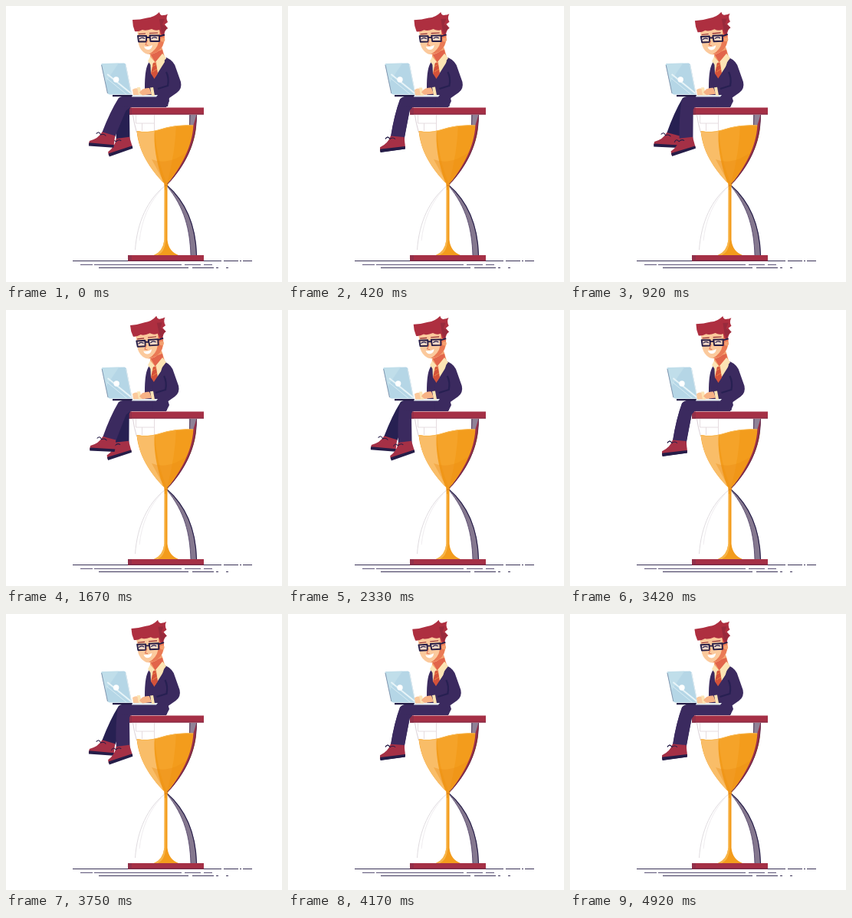
An HTML page with a canvas that plays this animation: 360x360 px, repeating every 5 s.

```html
<!DOCTYPE html>
<html lang="en">
<head>
<meta charset="utf-8">
<title>Working on the hourglass</title>
<style>
html, body { margin: 0; width: 100%; height: 100%; overflow: hidden; background: #fff; }
canvas { display: block; width: 100vw; height: 100vh; }
</style>
</head>
<body>
<canvas id="stage" width="360" height="360"></canvas>
<script>
const ctx = document.getElementById('stage').getContext('2d');
const LOOP = 5000, FRAMES = 60, TAU = Math.PI * 2;
const SUIT = '#3b2a5f', NAVY = '#272052', INK = '#251d48';
const RED = '#a53046', HAIR = '#ae2f40';
const SKIN = '#fbc99c', BLUSH = '#ea7a55', CREAM = '#fce4b4', SAND = '#f39c1c';

function fill(d, color) {
  ctx.fillStyle = color;
  ctx.fill(new Path2D(d));
}

function stroke(d, color, width = 1) {
  ctx.strokeStyle = color;
  ctx.lineWidth = width;
  ctx.stroke(new Path2D(d));
}

function rect(x, y, w, h, color) {
  ctx.fillStyle = color;
  ctx.fillRect(x, y, w, h);
}

function dot(x, y, r, color) {
  ctx.fillStyle = color;
  ctx.beginPath();
  ctx.arc(x, y, r, 0, TAU);
  ctx.fill();
}

function pivot(x, y, degrees, draw) {
  ctx.save();
  ctx.translate(x, y);
  ctx.rotate(degrees * Math.PI / 180);
  ctx.translate(-x, -y);
  draw();
  ctx.restore();
}

function shift(x, y, draw) {
  ctx.save();
  ctx.translate(x, y);
  draw();
  ctx.restore();
}

function ground() {
  stroke('M87 332.5H281M284 332.5H303M305 332.5H307M309 332.5H321', '#3b3358');
  stroke('M97 337.5H113M115 337.5H229M233 337.5H254M258 337.5H269', '#5d5478');
  stroke('M121 341.5H238M243 341.5H271M274 341.5H277M287 341.5H290', '#3b3358');
}

function plate(y, h) {
  rect(159, y, 99, h, RED);
  rect(159, y, 5, h, '#92304a');
  rect(159, y + h - 1, 99, 1, '#7c2742');
}

function upperGlass() {
  // Pane reflections
  stroke('M169.5 142V153H193.5V142M177.5 153V163M193.5 153V163', '#e3d9dd', 0.9);
  stroke('M165.5 142Q167 153 170.5 165', '#d5cad1', 0.9);
  fill('M239 142H249Q249 150 247 158L239 156Z', '#8f8297');
  stroke('M240 142L239.5 156', '#56405f');

  const sand = 'M170.5 163Q184 166 198 162Q222 154 248 156C247 182 231 210 211 232L209 235L207 232C188 213 173 190 170.5 163Z';
  fill(sand, SAND);
  ctx.save();
  ctx.clip(new Path2D(sand));
  fill('M170 160L194 160Q191 190 205 230L209 235L180 215Z', '#f9bd68');
  fill('M194 158L222 154Q221 190 210 232Q196 200 194 158Z', '#f5a329');
  fill('M190 200Q212 209 240 188L209 235Z', 'rgba(233,139,18,.35)');
  ctx.restore();
  stroke('M171 163.5Q184 166 198 162Q222 154 248 156', '#f9b64b');
  fill('M248.5 142C249 180 233 209 210 234C229 208 243 184 244.5 155Z', '#9a3048');
  stroke('M248.5 142C248.5 180 232.5 209 210.5 232', '#5a2a4c', 0.9);
}

function lowerGlass() {
  stroke('M207 235C185 252 171 282 168.5 318', '#dcd7dc', 0.9);
  stroke('M202 240C186 258 177 279 174 306', '#ebe8eb', 0.8);
  fill('M210 234C237 257 248 290 249 325H241C240 292 234 265 210 234Z', '#85788f');
  stroke('M210 234C236.5 257 247.5 290 248.5 325', INK, 1.1);
  stroke('M210 235C233 263 240 292 241 325', '#54446a', 0.9);

  fill('M206 229H212L210.5 236V305Q212 320 225 325H193Q205 320 206.5 305V236Z', SAND);
  fill('M207 240H208.2V307Q207 321 198 325H193Q205 320 206.5 305Z', '#f8b548');
  rect(207.5, 232, 3, 3, '#c66c22');
}

function hourglass() {
  lowerGlass();
  upperGlass();
  plate(132.5, 9);
  plate(325, 7.5);
}

function calf(angle, color) {
  pivot(155, 125, angle, () => {
    fill('M146 122Q150 117 160 118L168 125L159 136Q156 153 152.5 174L135 171Q139 142 146 122Z', color);
    fill('M135 170L152.5 171L154 185L121.5 190V185Q132 180 135 170Z', RED);
    fill('M121.5 187.5L154 183V186.5L122 191.5Z', INK);
    stroke('M128 174Q131 169 134 174Q138 171 141 174', INK, 1);
  });
}

function legs(swing) {
  const rest = 1.2;
  calf(rest - swing, NAVY);
  calf(rest + swing, SUIT);
  fill('M148 121Q151 117 161 117.5H211L213 124L209 132H160Q150 132 146 128Z', SUIT);
}

function torso(lean) {
  fill('M188 70L207 66L210 73V131H186Q180 121 181 106Q181 84 185 76Z', SUIT);
  fill('M188 67L205 63L207 73L195 92L189 88Z', CREAM);
  fill('M191 71L196 70L196 75L198 88L193.5 95L189 88L191.5 76Z', '#d4523a');
  stroke('M191 79L196 76M191 86L197 82', '#ed8c45', 0.9);

  // Near shoulder and arm
  shift(-3 * lean, 0, () => {
    fill('M209 67Q220 72 222 82L228 99Q230 108 223 113L213 120L211 131H193L193 98L205 80Z', SUIT);
    stroke('M209 86Q213 94 211 104L198 108', NAVY, 2.2);
  });
}

function eye(x, y) {
  rect(x, y, 9, 5, '#f0d9cd');
  stroke(`M${x + 1} ${y + 3}Q${x + 4} ${y} ${x + 8} ${y + 2.5}`, INK, 1.2);
}

function head(lean) {
  fill('M188 58L203 53L207 66L195 75L188 70Z', '#f3a26f');
  fill('M188 62L204 57L206 67L195 74Z', '#e2654b');
  fill('M204 62L209 68L202 77L195 73ZM188 66L194 73L189 77L185 72Z', CREAM);
  pivot(194, 66, -3.8 * lean, () => {
    fill('M171 29L204 26L207 43Q206 54 197 60Q188 65 182 62Q175 58 173 50Z', SKIN);
    fill('M201 29L207 38Q207 54 197 60Q191 63 186 63Q197 57 199 47Z', BLUSH);
    dot(204.5, 44, 2.8, '#f3a070');
    fill('M165 18Q175 18 184 15.5Q193 15 200 8Q201 13 205 12Q208 12 211 10.5Q208 16 211 21L207 24L211 29Q207 31 206 39L202 37L200 31Q195 33 190 30Q182 33 178 31Q172 34 168 33Q165 26 165 18Z', HAIR);
    fill('M200 17L207 17L204 24L211 29Q206 31 205 38L202 31Z', '#982a3c');
    stroke('M173 36.5L182 36M187 35.5L198 35', '#8d2630', 1.1);

    ctx.lineJoin = 'round';
    eye(173, 40);
    eye(189, 39.5);
    stroke('M172 39H183V46.5H173ZM187.5 38.5H200V46H188.5ZM183 41H187.5M200 39.5L207 37.5', INK, 1.9);
    stroke('M184.5 45L182 50.5L185.5 51.5', '#e2785a', 1.1);
    fill('M180 52.5Q185 54 191 51Q190 57 185 57Q181 56.5 180 52.5Z', '#fff');
  });
}

function laptop(slide) {
  shift(slide, 0, () => {
    const lid = 'M124 76Q125 75 127 75L154 74.5Q156 75 156.5 77L164 115.5H135Q132.5 115 132 113Z';
    fill(lid, '#b5d6e6');
    ctx.save();
    ctx.clip(new Path2D(lid));
    fill('M123 75L147 74L129 101Z', '#c0deea');
    stroke('M132 89L163 114', '#e7f4f8', 2);
    stroke('M131 94L158 116', '#d8ecf3', 1);
    ctx.restore();
    stroke('M156 77L163.5 115', '#dfeaf0', 1);
    stroke('M124.5 77L132.3 114', '#6f83a0', 0.8);
    dot(143.5, 96, 3.7, '#fff');
  });
  rect(139, 116, 27, 2.2, INK);
  fill('M165 116H198L196 118.5H164Z', '#e4edf2');
}

function hands(tap) {
  shift(0, tap, () => {
    fill('M165 109Q169 106 173 108L177 114V116H166Z', SKIN);
    fill('M171 106H175L177 116H173Z', CREAM);
  });
  shift(0, -tap, () => {
    fill('M174 113Q178 106 187 107L190 115L178 116.5Z', '#f7b285');
    fill('M188 106.5L192 106L194 117L190 117Z', CREAM);
  });
}

function wave(t, period, origin) {
  return Math.sin(TAU * (t - origin) / period);
}

function render(t) {
  const swing = 12 * wave(t, 1500, 4170);
  const lean = 0.5 + 0.5 * wave(t, 3000, 750);
  const slide = 1.3 - 1.2 * wave(t, 750, -146);
  const tap = 0.6 * wave(t, 375, 0);

  rect(0, 0, 360, 360, '#fff');
  ground();
  hourglass();
  legs(swing);
  torso(lean);
  head(lean);
  laptop(slide);
  hands(tap);
}

function tick() {
  const step = LOOP / FRAMES;
  const frame = Math.floor(((performance.now() + 3.4) % LOOP) / step);
  render(frame * step);
  requestAnimationFrame(tick);
}
tick();
</script>
</body>
</html>
```
